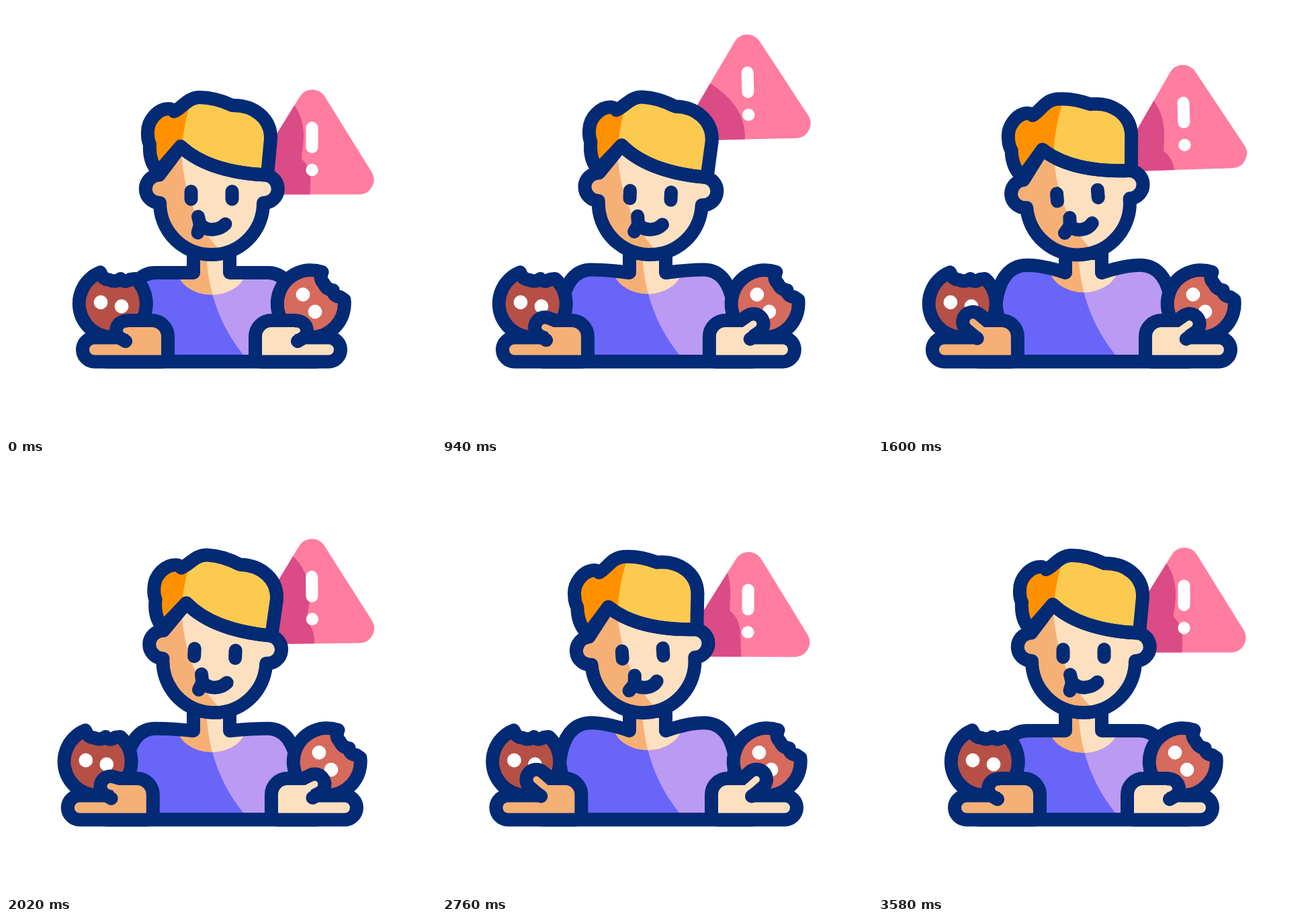
Recreate the animation shown at these times as an HTML page. Size 640 by 640 pixels, loop 3.6 s.

```html
<!DOCTYPE html>
<html lang="en">
<head>
<meta charset="utf-8">
<title>Snack warning</title>
<style>
  html, body { margin: 0; width: 100%; height: 100%; overflow: hidden; background: #fff; }
  svg { display: block; width: 100vw; height: 100vh; }
  .ink { fill: none; stroke: #032a75; stroke-width: 20; stroke-linecap: round; stroke-linejoin: round; }
  .rim { stroke-width: 40; }
  .tip { stroke-width: 50; }
  .finger { fill: none; stroke-width: 10; stroke-linecap: round; }
</style>
</head>
<body>
<svg viewBox="0 0 640 640">
  <defs>
    <path id="face" d="M228 251.5A20.5 20.5 0 0 0 229 293A77 77 0 0 0 383 293A20.5 20.5 0 0 0 385 251.5C340 249 291 238 260 209Z"/>
    <path id="hair" d="M227 247C217 237 213 222 214 206C210 198 211 190 211 187C211 170 226 153 242 153Q247 153 250 157C262 152 270 136 288 136C306 136 322 141 337 148C368 147 395 167 394 198L389 251.5C340 250 291 238 260 209Z"/>
    <path id="sign" d="M474.7 135L544.2 247A22 22 0 0 1 525.5 280.5H386.5A22 22 0 0 1 367.8 247L437.3 135A22 22 0 0 1 474.7 135Z"/>
    <path id="crumb" d="M-18 -46.6Q-15 -36 -5 -35.500Q4 -31 12 -37Q18 -30 26 -36L34 -37A50 50 0 1 1 -18 -46.6Z"/>
    <path id="limb" d="M132 503.5H182V478H217A14 14 0 0 1 231 492V519.5H132A8 8 0 0 1 132 503.5Z"/>
    <clipPath id="inSign"><use class="sway" href="#sign"/></clipPath>
    <clipPath id="lit"><path d="M640 100H290C266 160 260 205 262 230C268 290 290 335 319 364L330 385H640Z"/></clipPath>
    <clipPath id="litBody"><path d="M640 365H298C300 424 318 475 353 519V530H640Z"/></clipPath>
    <clipPath id="inShirt"><path class="shirt"/></clipPath>
  </defs>

  <use class="sway" href="#sign" fill="#ff7da0"/>
  <g clip-path="url(#inSign)">
    <path class="nod" fill="#db4b86" d="M300 310V110H385C425 132 444 160 443 195C443 208 440 218 440 228C450 236 454 250 453 264L452 300Z"/>
  </g>
  <g class="sway">
    <path d="M455.5 181V210" stroke="#fff" stroke-width="18" stroke-linecap="round"/>
    <circle cx="455.5" cy="244" r="9.2" fill="#fff"/>
  </g>

  <path class="shirt" fill="#6965f9"/>
  <path class="shirt" fill="#bb9af3" clip-path="url(#litBody)"/>
  <g clip-path="url(#inShirt)">
    <ellipse class="collar" cx="306" rx="52" ry="40" fill="#f6b076"/>
    <g clip-path="url(#litBody)"><ellipse class="collar" cx="306" rx="52" ry="40" fill="#fce0bf"/></g>
  </g>
  <path class="shirt ink"/>

  <g class="nod">
    <use href="#face" fill="#f6b076"/>
    <use href="#hair" fill="#ff9100"/>
  </g>
  <g clip-path="url(#lit)">
    <g class="nod">
      <use href="#face" fill="#fce0bf"/>
      <use href="#hair" fill="#fdca50"/>
    </g>
  </g>
  <g class="nod ink">
    <use href="#face"/>
    <use href="#hair"/>
    <path d="M275.5 276V287.5M336.5 276V287.5"/>
    <path id="mouth"/>
  </g>

  <path class="ink" d="M150 529.5H462"/>
  <g id="left"></g>
  <g id="right"></g>
</svg>
<script>
const LOOP = 3600;
const $ = s => document.querySelector(s);
const all = (s, name, value) => document.querySelectorAll(s).forEach(e => e.setAttribute(name, value));
const mix = (a, b, k) => a + (b - a) * k;

const part = (t, from, to) => Math.min(1, Math.max(0, (t - from) / (to - from)));
const ease = (t, from, to) => (1 - Math.cos(Math.PI * part(t, from, to))) / 2;
// A run of smooth beats, each going 0, 1, 0.
const beats = (t, from, period, count) =>
  (1 - Math.cos(2 * Math.PI * count * part(t, from, from + period * count))) / 2;

function buildArm(id, skin, cookie, bite, chips) {
  const dots = chips.map(([x, y]) => `<circle cx="${x}" cy="${y}" r="10.4" fill="#fff"/>`).join("");
  $(id).innerHTML = `
    <g transform="translate(158.5 443)">
      <use href="#crumb" class="ink" style="fill:${cookie}" transform="${bite}"/>${dots}
    </g>
    <use href="#limb" class="ink rim"/>
    <path class="ink tip thumb"/>
    <use href="#limb" fill="${skin}"/>
    <path class="finger thumb" stroke="${skin}"/>
    <path class="ink gap"/>`;
}

function poseArm(id, place, grip) {
  $(id).setAttribute("transform", place);
  all(id + " .thumb", "d",
    `M${mix(179, 174, grip)} ${mix(483.5, 469.5, grip)}L194 ${mix(483.5, 487, grip)}`);
  all(id + " .gap", "d", `M166 ${mix(492, 484, grip)}L${mix(178, 181, grip)} ${mix(499, 494.5, grip)}`);
}

function shirtPath(lift) {
  const y = mix(397, 385, lift), bend = mix(397, 391, lift), side = mix(180, 175, lift);
  const near = mix(203, 196, lift), far = mix(188, 179, lift), drop = mix(410, 405, lift);
  const m = x => 612 - x;
  return `M279 368V397C262 ${bend} 240 ${y} 222 ${y}C${near} ${y} ${far} ${drop} ${side} 445L190 529`
    + `H422L${m(side)} 445C${m(far)} ${drop} ${m(near)} ${y} 390 ${y}C372 ${y} 350 ${bend} 333 397V368Z`;
}

function drawSign(t) {
  const fall = 1 - (1 - part(t, 790, 2560)) ** 1.35;
  const y = -93.5 * ease(t, 480, 790) + 100.5 * fall - 7 * ease(t, 2560, LOOP);
  const turn = .05 * y + 2.7 * beats(t, 400, 360, 2);
  all(".sway", "transform", `translate(0 ${y}) rotate(${turn} 456 213)`);
}

function drawHead(t, chew) {
  const lean = 7 * (ease(t, 100, 625) - ease(t, 2725, 3250)) - 13.5 * beats(t, 100, 1050, 3);
  all(".nod", "transform", `rotate(${lean * 1.18 * (1 - t / 6000)} 306 385)`);
  $("#mouth").setAttribute("d",
    `M${mix(286, 292, chew)} 313.5L${mix(289, 291, chew)} 326L${mix(285.5, 282, chew)} ${mix(337.5, 335.5, chew)}`
    + `M290 326C300 336 317 334 ${mix(326.5, 324, chew)} 324.5`);
}

function draw(t) {
  const chew = beats(t, 120, 1040, 3);
  const grip = beats(t, 270, 1000, 3);
  const leftX = -18 * (ease(t, 120, 640) - ease(t, 2720, 3380)) - 16 * chew;
  const rightX = 18 * (ease(t, 240, 760) - ease(t, 3000, 3500)) + 12 * grip;

  drawSign(t);
  drawHead(t, chew);
  all(".shirt", "d", shirtPath(chew));
  all(".collar", "cy", 390 - 4 * chew);
  poseArm("#left", `translate(${leftX} 0)`, chew);
  poseArm("#right", `translate(${612 + rightX} 0) scale(-1 1)`, grip);
}

// The right arm is mirrored, so its bite is flipped back and swung round.
buildArm("#left", "#f6b076", "#b65047", "", [[-17.5, -2], [13.5, 4]]);
buildArm("#right", "#fce0bf", "#d66a5c", "scale(-1 1) rotate(41)", [[11.5, -13.5], [-6.5, 12]]);

const start = performance.now();
function tick() {
  draw((performance.now() - start) % LOOP);
  requestAnimationFrame(tick);
}
draw(0);
requestAnimationFrame(tick);
</script>
</body>
</html>
```
